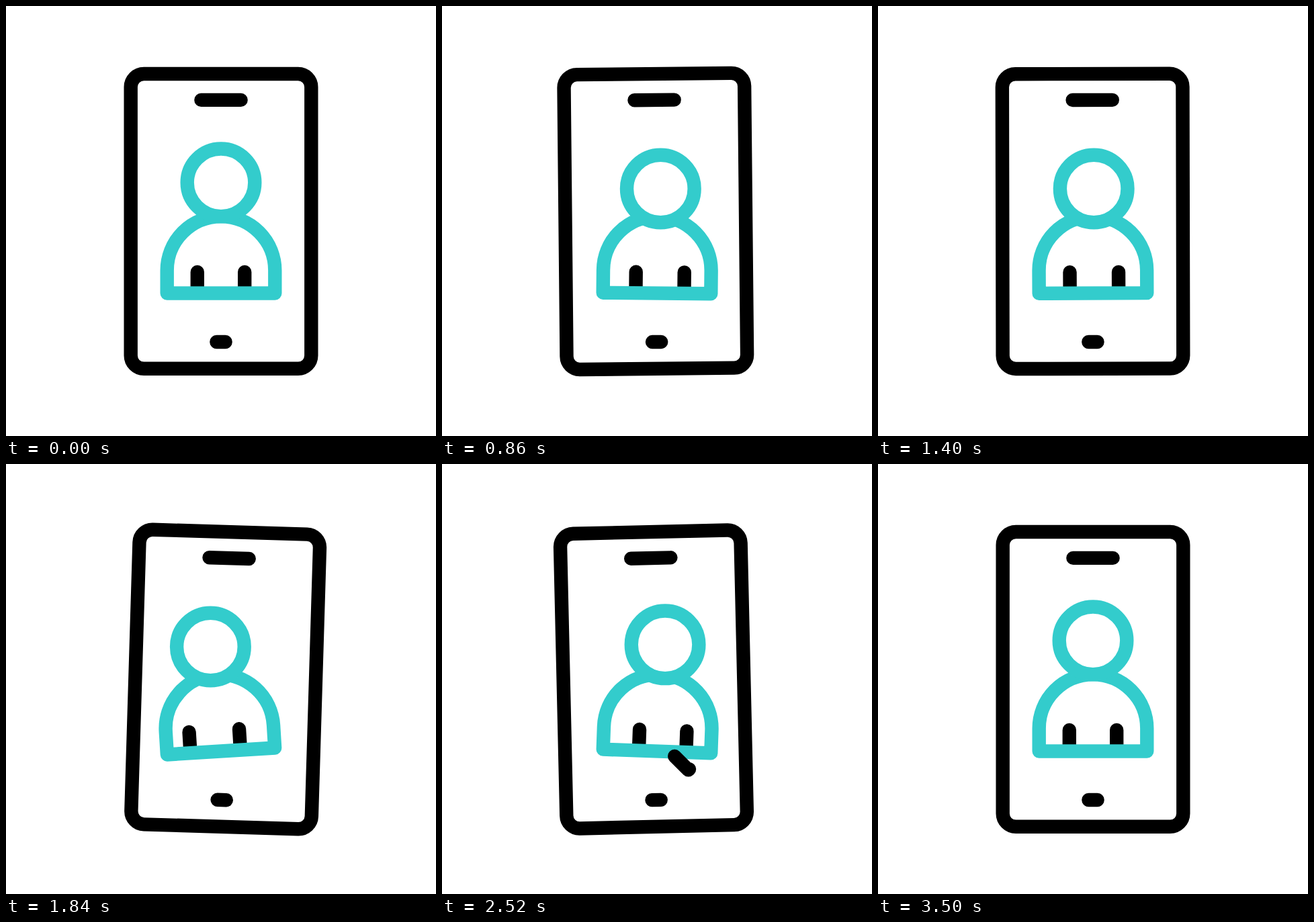
An HTML page that plays this animation: 640x640 px, repeating every 3600 ms.

```html
<!DOCTYPE html>
<html lang="en">
<head>
<meta charset="utf-8">
<title>Phone profile verified</title>
<style>
  html, body { margin: 0; width: 100%; height: 100%; overflow: hidden; background: #fff; }
  svg { display: block; width: 100vw; height: 100vh; }
  .line { fill: none; stroke: #000; stroke-width: 20.4; stroke-linecap: round; stroke-linejoin: round; }
  .teal { stroke: #33cccc; }
  #glow { stroke-width: 23.4; }
  #head { fill: #fff; }
</style>
</head>
<body>
<svg viewBox="0 0 640 640">
  <g id="phone" class="line">
    <rect x="185.7" y="101" width="268.6" height="438.8" rx="19.5"/>
    <path d="M290.4 139.9H349.6M313.4 500H326.6"/>
    <path id="glow" class="teal" d="M290.4 139.9H349.6M313.4 500H326.6"/>
  </g>
  <g id="body" class="line">
    <path id="left" d="M284.8 396V424"/>
    <path id="right" d="M355.2 396V424"/>
    <path class="teal" d="M239.7 427.5V393.5A80.3 80.3 0 0 1 400.3 393.5V427.5Z"/>
  </g>
  <circle id="head" class="line teal" cx="320" cy="262.8" r="50.3"/>
  <path id="check" class="line" pathLength="1" d="M346.2 435L366.8 455.4L407 414.6"/>
</svg>
<script>
const LOOP = 3600;
const $ = id => document.getElementById(id);
const [phone, glow, body, left, right, head, check] =
  ['phone', 'glow', 'body', 'left', 'right', 'head', 'check'].map($);

// Pose: phone angle, head x, head y, body angle, left arm x, right arm x
const REST = [0, 0, 0, 0, 0, 0];
const TILT_RIGHT = [2, -18, 9.2, -4, -12, -7.5];
const TILT_LEFT = [-2, 18.3, 9.2, 3.1, 12.3, 12.3];
const MOVES = [
  [0, 480, TILT_RIGHT],
  [600, 1080, TILT_LEFT],
  [1200, 1650, TILT_RIGHT],
  [1760, 2240, TILT_LEFT],
  [2360, 2790, REST],
];

const ramp = (t, from, to) => Math.min(1, Math.max(0, (t - from) / (to - from)));

// cubic-bezier(.4, 0, .5, 1), solved by bisection
function ease(x) {
  if (x <= 0 || x >= 1) return x;
  let lo = 0, hi = 1, s;
  for (let i = 0; i < 20; i++) {
    s = (lo + hi) / 2;
    const r = 1 - s;
    if (1.2 * r * r * s + 1.5 * r * s * s + s * s * s < x) lo = s; else hi = s;
  }
  return s * s * (3 - 2 * s);
}

function poseAt(t) {
  let pose = REST;
  for (const [from, to, target] of MOVES) {
    const k = ease(ramp(t, from, to));
    pose = pose.map((v, i) => v + (target[i] - v) * k);
  }
  return pose;
}

const pulse = (t, on, off) => ramp(t, on - 20, on + 20) - ramp(t, off - 20, off + 20);
const move = (el, x, y = 0) => el.setAttribute('transform', `translate(${x} ${y})`);
const turn = (el, angle, y) => el.setAttribute('transform', `rotate(${angle} 320 ${y})`);

function draw(now) {
  const t = now % LOOP;
  const [tilt, headX, headY, lean, leftX, rightX] = poseAt(t);
  turn(phone, tilt, 540);
  turn(body, lean, 427.5);
  move(head, headX, headY);
  move(left, leftX);
  move(right, rightX);
  glow.style.opacity = pulse(t, 2640, 2920) + pulse(t, 3200, 3480);

  const drawn = ease(ramp(t, 2360, 2780)) - ease(ramp(t, 3180, 3500));
  check.style.visibility = drawn > 0.001 ? 'visible' : 'hidden';
  check.style.strokeDasharray = `${drawn} 2`;
  requestAnimationFrame(draw);
}
requestAnimationFrame(draw);
</script>
</body>
</html>
```
